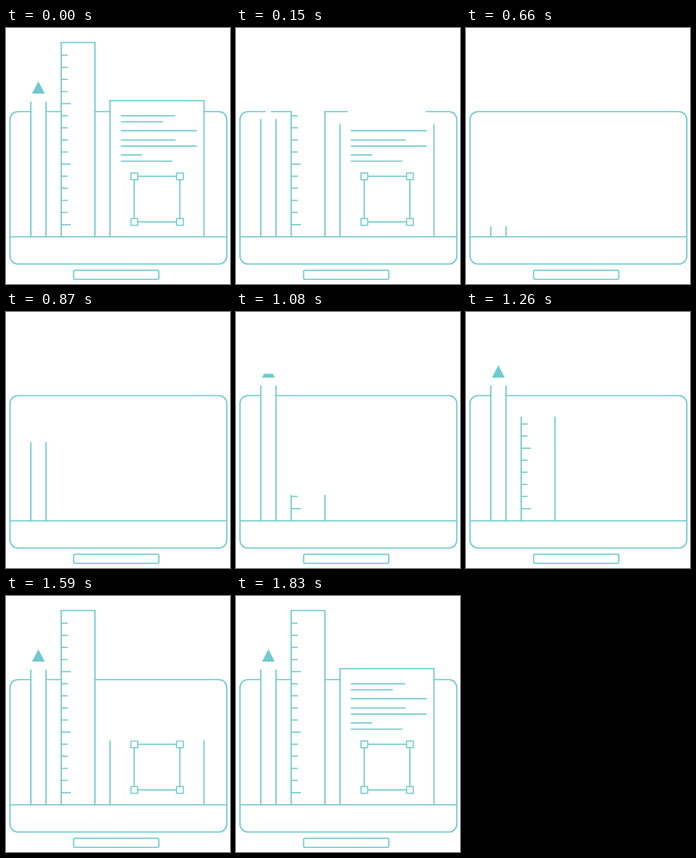
An HTML page for the animation above (2.07 s loop, 280 px wide and 320 px high).

```html
<!DOCTYPE html>
<html lang="en">
<head>
<meta charset="utf-8">
<title>Design desk</title>
<style>
  html, body { margin: 0; width: 100%; height: 100%; overflow: hidden; background: #fff; }
  svg {
    position: absolute; left: 0; top: 0; width: 280px; height: 320px;
    fill: none; stroke: #70cacd; stroke-width: 1.6;
  }
  .solid { fill: #70cacd; stroke: none; }
  .gap { fill: #fff; stroke: none; transform-box: fill-box; transform-origin: center; }
  .handle { fill: #fff; stroke-width: 1.4; }

  .pencil, .ruler, .page, .gap { animation: 2070ms linear -1ms infinite; }
  .pencil { animation-name: pencil; }
  .ruler { animation-name: ruler; }
  .page { animation-name: page; }
  .pencil-gap { animation-name: pencil-gap; }
  .ruler-gap { animation-name: ruler-gap; }
  .page-gap { animation-name: page-gap; }

  /* Each tool is wiped away downwards, then uncovered upwards in 30 ms steps. */
  @keyframes pencil {
    0% { clip-path: inset(32px 0 0 0); animation-timing-function: steps(14); }
    20.2899% { clip-path: inset(261px 0 0 0); animation-timing-function: step-end; }
    30.4348% { clip-path: inset(260px 0 0 0); animation-timing-function: steps(16); }
    53.6232% { clip-path: inset(65px 0 0 0); animation-timing-function: step-end; }
    100% { clip-path: inset(32px 0 0 0); }
  }
  @keyframes ruler {
    0% { clip-path: inset(17px 0 0 0); animation-timing-function: steps(14); }
    20.2899% { clip-path: inset(261px 0 0 0); animation-timing-function: step-end; }
    49.2754% { clip-path: inset(261px 0 0 0); animation-timing-function: steps(15); }
    71.0145%, 100% { clip-path: inset(17px 0 0 0); }
  }
  @keyframes page {
    0% { clip-path: inset(42px 0 0 0); animation-timing-function: steps(14); }
    20.2899% { clip-path: inset(261px 0 0 0); animation-timing-function: step-end; }
    66.6667% { clip-path: inset(261px 0 0 0); animation-timing-function: steps(15); }
    88.4058% { clip-path: inset(88.5px 0 0 0); animation-timing-function: step-end; }
    100% { clip-path: inset(42px 0 0 0); }
  }

  /* The screen edge closes from both sides and opens again at once. */
  @keyframes pencil-gap {
    0%, 6.4% { transform: scaleX(1); }
    7.8% { transform: scaleX(0); animation-timing-function: step-end; }
    49.2754%, 100% { transform: scaleX(1); }
  }
  @keyframes ruler-gap {
    0%, 7.2% { transform: scaleX(1); }
    10.6% { transform: scaleX(0); animation-timing-function: step-end; }
    63.7681%, 100% { transform: scaleX(1); }
  }
  @keyframes page-gap {
    0%, 5.8% { transform: scaleX(1); }
    15.1% { transform: scaleX(0); animation-timing-function: step-end; }
    86.9565%, 100% { transform: scaleX(1); }
  }
</style>
</head>
<body>
<svg viewBox="0 0 280 320">
  <rect x="5" y="104.5" width="271" height="190.5" rx="10"/>
  <path d="M5 261H276"/>
  <rect x="84.5" y="302.8" width="106.5" height="11.4" rx="2"/>
  <rect class="gap pencil-gap" x="31" y="102" width="19" height="5"/>
  <rect class="gap ruler-gap" x="69" y="102" width="42" height="5"/>
  <rect class="gap page-gap" x="130" y="102" width="117" height="5"/>
</svg>

<svg class="pencil" viewBox="0 0 280 320">
  <path d="M31 92V261M50 92V261"/>
  <path class="solid" d="M40.5 66.5L48.5 82H32.5Z"/>
</svg>

<svg class="ruler" viewBox="0 0 280 320">
  <path d="M69 261V18.3H111.2V261"/>
  <path d="M73 33.3V247" stroke-width="8" stroke-dasharray="1.5 13.62"/>
  <path d="M79 93.8V247" stroke-width="4" stroke-dasharray="1.5 74.1"/>
</svg>

<svg class="page" viewBox="0 0 280 320">
  <path d="M130 261V90.8H247.5V261"/>
  <path d="M143.5 109.7H211.5M143.5 117.3H196M143.5 128.4H238.5M143.5 140H212M143.5 147.6H238.5M143.5 158.6H170M143.5 166.5H208"/>
  <rect x="160.3" y="185.4" width="57" height="57"/>
  <g class="handle">
    <rect x="156.2" y="181.2" width="8.4" height="8.4"/>
    <rect x="213.2" y="181.2" width="8.4" height="8.4"/>
    <rect x="156.2" y="238.2" width="8.4" height="8.4"/>
    <rect x="213.2" y="238.2" width="8.4" height="8.4"/>
  </g>
</svg>
</body>
</html>
```
